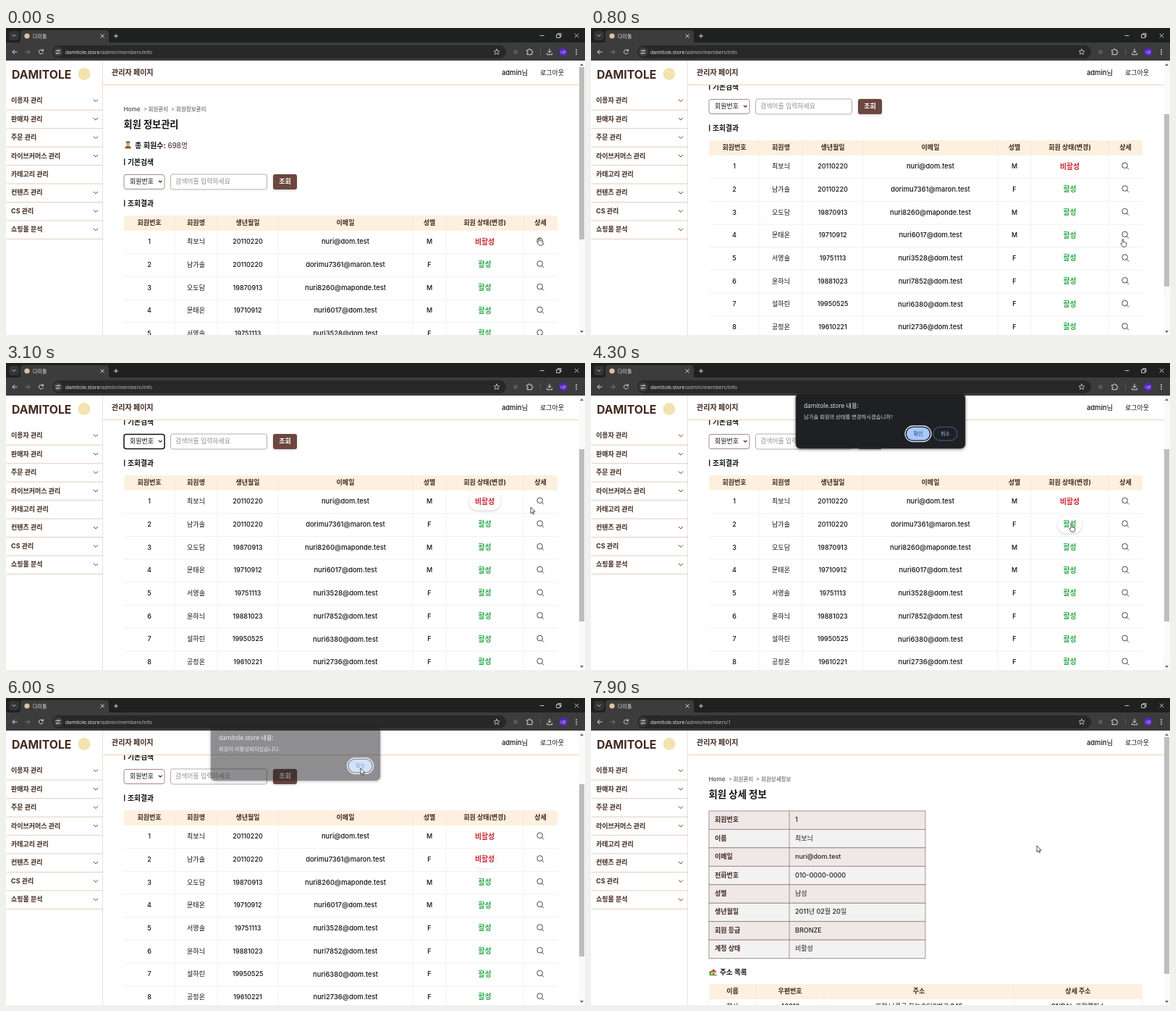
Animation of 800x424 px, one loop 8 s. Source, as an HTML page:

```html
<!DOCTYPE html>
<html lang="ko">
<head>
<meta charset="utf-8">
<title>회원 정보관리</title>
<style>
  html, body { margin: 0; width: 100%; height: 100%; overflow: hidden; background: #fff; }
  svg { display: block; }
  text { font-family: Inter, "Noto Sans CJK KR", "Noto Sans CJK", sans-serif; font-weight: 500; white-space: pre; }
  .b { font-weight: 700; }
  .m { text-anchor: middle; }
  .ui { font-family: "Open Sans", "Noto Sans CJK KR", "Noto Sans CJK", sans-serif; font-weight: 400; }
  .line { fill: none; stroke-linecap: round; stroke-linejoin: round; }
  .pill { filter: drop-shadow(0 1.5px 1.5px #0003); }
  .box { filter: drop-shadow(0 1px 2px #0007); }
</style>
</head>
<body>
<svg id="stage" width="800" height="424" viewBox="0 0 800 424"></svg>
<script>
const LOOP = 8000, STEP = 100, SCROLL = 104;
const BROWN = '#42291f', RED = '#c8202f', GREEN = '#28a745';
const HOST = 'damitole.store';

const members = [
  ['최보늬', '20110220', 'nuri@dom.test', 'M'],
  ['남가솔', '20110220', 'dorimu7361@maron.test', 'F'],
  ['오도담', '19870913', 'nuri8260@maponde.test', 'M'],
  ['문태온', '19710912', 'nuri6017@dom.test', 'M'],
  ['서영솔', '19751113', 'nuri3528@dom.test', 'F'],
  ['윤하늬', '19881023', 'nuri7852@dom.test', 'F'],
  ['설하린', '19950525', 'nuri6380@dom.test', 'F'],
  ['공정온', '19610221', 'nuri2736@dom.test', 'F']
];

// Shape helpers
const text = (x, y, s, size = 9, cls = '', fill = '#111', id = '') =>
  `<text x="${x}" y="${y}" dy=".36em" font-size="${size}" class="${cls}" fill="${fill}" ${id && `id="${id}"`}>${s}</text>`;
const rect = (x, y, w, h, fill, r = 0, more = '') =>
  `<rect x="${x}" y="${y}" width="${w}" height="${h}" rx="${r}" fill="${fill}" ${more}/>`;
const line = (d, color, width = 1) =>
  `<path class="line" d="${d}" stroke="${color}" stroke-width="${width}"/>`;
const circle = (x, y, r, fill, more = '') => `<circle cx="${x}" cy="${y}" r="${r}" fill="${fill}" ${more}/>`;
const group = (id, body, more = '') => `<g id="${id}" ${more}>${body}</g>`;

function browser() {
  const ink = '#d8d8d8';
  return rect(0, 0, 800, 21, '#1f2020') + rect(0, 20, 800, 25, '#3c3c3c') +
    rect(4, 4, 14, 13, '#343535', 4) + line('M9 9.5l2 2 2-2', ink) +
    `<path d="M17 20q3 0 3-3V7q0-4 4-4H138q4 0 4 4v10q0 3 3 3z" fill="#3c3c3c"/>` +
    circle(29, 11, 3.6, '#d9c79a') + text(37, 11, '다미톨', 7, 'ui', '#e3e3e3') +
    line('M131 8.8l4.4 4.4m0-4.4l-4.4 4.4', ink) +
    line('M149.5 11h5m-2.5-2.5v5', ink) +
    line('M738 10.5h5M761 9h4.5v4.5H761zM762.6 9V7.6h4.4V12h-1.4M786 8l5 5m0-5l-5 5', ink, .9) +
    line('M15 33H9m2.7-2.8L9 33l2.7 2.8', ink) +
    line('M27 33h6m-2.7-2.8L33 33l-2.7 2.8', '#7a7a7a') +
    line('M51 31.2a3 3 0 1 0 .3 2.8M51.4 29.4v2.2h-2.2', ink) +
    rect(64, 24, 627, 18, '#282828', 9) + circle(72, 33, 6.5, '#3c3c3c') +
    line('M69 31.2h2.6m2.6 0h.6M69 34.8h.6m2.6 0h2.6', ink) +
    circle(73, 31.2, 1, 'none', `stroke="${ink}" stroke-width=".8"`) +
    circle(70.8, 34.8, 1, 'none', `stroke="${ink}" stroke-width=".8"`) +
    `<text x="82" y="33" dy=".36em" font-size="7" class="ui" fill="#f0f0f0">${HOST}<tspan id="path" fill="#c4c4c4"></tspan></text>` +
    line('M678 29.2l1.1 2.4 2.7.3-2 1.8.6 2.7-2.4-1.4-2.4 1.4.6-2.7-2-1.8 2.7-.3z', ink, .8) +
    circle(704, 33, 3, '#5e5655') +
    line('M720 30.5h2q0-1.8 1.3-1.8t1.3 1.8h2v2q1.4 0 1.4 1.1t-1.4 1.1v2H720v-2q1.2 0 1.2-1.1T720 32.5z', ink) +
    line('M738.5 29v8', '#5c5c5c') +
    line('M751 29v5m-2.2-2l2.2 2 2.2-2M747.5 35v1.8h7V35', ink) +
    circle(770, 33, 6, '#5427b5') + text(770, 33, '다온', 4.2, 'ui m', '#fff') +
    [30, 33, 36].map(y => circle(788, y, .9, ink)).join('');
}

function sidebar() {
  const items = ['이용자 관리', '판매자 관리', '주문 관리', '라이브커머스 관리', '카테고리 관리', '컨텐츠 관리', 'CS 관리', '쇼핑몰 분석'];
  return rect(0, 45, 133, 379, '#fff') + line('M133.5 45V424', '#eedfd8') +
    text(8, 64, 'DAMITOLE', 15.8, 'b', BROWN) + circle(108, 63.5, 8.5, '#f2e3b0') +
    items.map((s, i) => {
      const y = 100 + i * 25.45;
      return text(7, y, s, 9, 'b', BROWN) + line(`M1 ${y + 13.3}H133`, '#dcbfb0', .8) +
        (i === 4 ? '' : line(`M121.3 ${y - 1}l2.7 2.7 2.7-2.7`, '#50403a'));
    }).join('');
}

function header() {
  return rect(134, 45, 657, 34, '#fff') + line('M134 78.5H791', '#f0cfb8') +
    text(146, 61.5, '관리자 페이지', 10, 'b', BROWN) +
    text(685, 61.5, 'admin님', 9.4) + text(738, 61.5, '로그아웃', 9);
}

const crumbs = last => text(162.5, 112, 'Home', 8.2, '', '#4b4b52') + text(190, 112, '&gt;', 7.5, '', '#777') +
  text(196.5, 112, '회원관리', 7.5, '', '#4b4b52') + text(228, 112, '&gt;', 7.5, '', '#777') +
  text(235, 112, last, 7.5, '', '#4b4b52');

const heading = (y, s) => rect(163, y - 4.5, 1.4, 9, '#222') + text(168, y, s, 9.8, 'b');

function tableHead(y, cols, names) {
  return `<path d="M163 ${y + 21}v-17q0-4 4-4H758q4 0 4 4v17z" fill="#fdf0df"/>` +
    names.map((s, i) => text((cols[i] + cols[i + 1]) / 2, y + 10, s, 9, 'b m', BROWN)).join('') +
    cols.slice(1, -1).map(x => line(`M${x} ${y}v21`, '#f3e6d8', .7)).join('');
}

function listPage() {
  const cols = [163, 233, 292, 376, 562, 608, 715, 762];
  const mid = i => (cols[i] + cols[i + 1]) / 2;
  let out = crumbs('회원정보관리') + text(162.5, 133.5, '회원 정보관리', 13.2, 'b') +
    circle(168.5, 159.5, 2.6, '#dba774') + rect(165.6, 156.6, 5.8, 2, '#7b4a2a', 1) +
    `<path d="M164.4 166.5q.2-4 4.2-4t4.2 4z" fill="#8a5a34"/>` +
    text(178, 162, '총 회원수:', 10.1, 'b') + text(223.5, 162, '698명', 9.8, '', '#5a3a33') +
    heading(185, '기본검색') +
    rect(163, 202.5, 56, 20, '#fff', 3, 'id="select"') + text(171, 212, '회원번호', 9) +
    line('M211.2 211.2l2 2 2-2', '#222', 1.2) +
    rect(227.5, 202, 133, 21, '#fff', 3, 'stroke="#b9aaa6" stroke-width="1"') +
    text(234, 212, '검색어를 입력하세요', 8.9, '', '#8f8f95') +
    rect(369, 202, 33, 21, '#6b4740', 3, 'class="pill"') + text(385.5, 212, '조회', 9, 'b m', '#fff') +
    heading(242, '조회결과') +
    tableHead(259, cols, ['회원번호', '회원명', '생년월일', '이메일', '성별', '회원 상태(변경)', '상세']);

  members.forEach(([name, birth, mail, sex], i) => {
    const top = 280 + i * 31.7, y = top + 15;
    const half = i ? 17 : 22;
    const cells = [i + 1, name, birth, mail, sex];
    out += line(`M163 ${top + 31.7}H762`, '#ececee', .8);
    out += cols.slice(1, -1).map(x => line(`M${x} ${top}v31.7`, '#efeff1', .8)).join('');
    out += cells.map((s, k) => text(mid(k), y, s, k === 3 ? 9.4 : 9, 'm')).join('');
    if (i < 2) out += rect(661.5 - half, y - 12, half * 2, 24.5, '#fff', 12, `id="pill${i}" class="pill"`);
    out += text(661.5, y, i ? '활성' : '비활성', 9.8, 'b m', i ? GREEN : RED, 'state' + i);
    out += circle(737.6, y - 1.2, 3.8, 'none', 'stroke="#5c3c36" stroke-width="1"') +
      line(`M740.4 ${y + 1.6}l2.4 2.4`, '#5c3c36');
  });
  return out;
}

function detailPage() {
  const rows = [['회원번호', '1'], ['이름', members[0][0]], ['이메일', members[0][2]], ['전화번호', '010-0000-0000'],
    ['성별', '남성'], ['생년월일', '2011년 02월 20일'], ['회원 등급', 'BRONZE'], ['계정 상태', '비활성']];
  const cols = [163, 228, 322, 584, 762], h = 25.45;
  const address = ['학사', '40210', '가람 나루구 하늘솔단6번로 245', 'ONDAL 가람캠퍼스'];
  return crumbs('회원상세정보') + text(162.5, 133.5, '회원 상세 정보', 13.4, 'b') +
    rows.map(([label, value], i) => {
      const y = 156 + i * h;
      return rect(163, y, 299, h, i % 2 ? '#f3f2f3' : '#eee8e7', 0, 'stroke="#927a73" stroke-width=".8"') +
        text(171, y + 12, label, 9, 'b', BROWN) + text(282, y + 12, value, 9, '', '#222');
    }).join('') +
    line('M274 156V359.6', '#927a73', .8) +
    circle(166.2, 379.5, 2.8, '#3fa344') + rect(166, 378, 6.5, 5, '#e5c79d') +
    `<path d="M164.6 378.5l4.7-4.3 4.7 4.3z" fill="#c4513d"/>` + rect(163.5, 382, 10.5, 1.4, '#4caf50') +
    rect(168.3, 379.8, 1.8, 3, '#8b5836') +
    text(178, 378.5, '주소 목록', 9.6, 'b') +
    tableHead(395, cols, ['이름', '우편번호', '주소', '상세 주소']) +
    cols.map(x => line(`M${x} 416V424`, '#ececee', .8)).join('') +
    address.map((s, i) => text((cols[i] + cols[i + 1]) / 2, 425.5, s, 9, 'm')).join('');
}

const okButton = x => rect(x - 18, 87, 36, 21.5, 'none', 10.75, 'stroke="#d6e4fd" stroke-width="1.3"') +
  rect(x - 16, 89, 32, 17.5, '#a8c7fa', 8.75) + text(x, 97.8, '확인', 7, 'ui m', '#0b3272');

const dialog = (id, message, buttons) => group(id,
  rect(283, 42, 234, 76, '#1f2023', 6, 'class="box" stroke="#3a3b3e" stroke-width=".6"') +
  text(294, 59, HOST + ' 내용:', 8.3, 'ui', '#eeeeee') + text(294, 74.3, message, 7.3, 'ui', '#d6d6d6') + buttons);

const cancelButton = rect(473, 88.3, 33, 18.8, 'none', 9.4, 'stroke="#4b6b99" stroke-width=".9"') +
  text(489.5, 97.8, '취소', 7, 'ui m', '#a8c7fa');

const stage = document.getElementById('stage');
stage.innerHTML =
  `<clipPath id="main"><rect x="134" y="79" width="657" height="345"/></clipPath>` +
  rect(0, 0, 800, 424, '#fff') +
  `<g clip-path="url(#main)">${group('list', listPage())}${group('detail', detailPage())}</g>` +
  sidebar() + header() +
  rect(791, 45, 9, 379, '#fafafa') + rect(792, 54, 7, 238, '#bdbdbd', 0, 'id="thumb"') +
  `<path d="M793 52l2.5-3 2.5 3zM793 418l2.5 3 2.5-3z" fill="#666"/>` +
  browser() +
  dialog('ask', members[1][0] + ' 회원의 상태를 변경하시겠습니까?', okButton(452) + cancelButton) +
  dialog('done', '회원이 비활성화되었습니다.', okButton(489.5)) +
  group('arrow', `<path d="M0 0v8.6l2-1.8 1.3 3 1.4-.6-1.3-2.9h2.7z" fill="#fff" stroke="#222" stroke-width=".8"/>`) +
  group('hand', `<path d="M-.9 5V.6q0-1 .9-1t.9 1V3.6l3 .7q1.2.4 1.1 1.6l-.5 2.6q-.2 1-.9 1.7H-.2L-3 6.6q-.5-.9.2-1.3.7-.3 1.2.3z" fill="#fff" stroke="#222" stroke-width=".8"/>`);

const el = Object.fromEntries([...stage.querySelectorAll('[id]')].map(n => [n.id, n]));

// Linear value along [time, value] steps
function track(t, steps) {
  const i = steps.findIndex(s => s[0] > t);
  if (i < 0) return steps[steps.length - 1][1];
  if (i === 0) return steps[0][1];
  const [t0, a] = steps[i - 1], [t1, b] = steps[i];
  return a + (b - a) * (t - t0) / (t1 - t0);
}

const scrollSteps = [[0, 0], [100, 12], [200, 45], [300, 78], [400, 96], [500, SCROLL]];
const askSteps = [[3800, 0], [4000, 1], [5000, 1], [5200, .25], [5300, 0]];
const doneSteps = [[5100, 0], [5200, .55], [5300, 1], [5900, 1], [6100, 0]];
const pillSteps = [
  [[2600, 0], [2800, 1], [3100, 1], [3300, 0]],
  [[3400, 0], [3600, 1], [5900, 1], [6100, 0]]
];
// time, x, y, hand pointer
const pointer = [
  [0, 737, 290, 1], [700, 735, 292, 1], [1000, 735, 292, 0], [1600, 205, 108, 0], [2200, 205, 108, 0],
  [2700, 662, 192, 1], [2900, 666, 194, 0], [3100, 725, 199, 0], [3300, 716, 208, 0], [3600, 664, 223, 1],
  [4500, 664, 223, 0], [4900, 454, 100, 0], [5300, 454, 100, 0], [5600, 490, 97, 0], [6000, 490, 97, 0],
  [6500, 718, 195, 0], [6600, 722, 194, 0], [6800, 737, 188, 1], [7100, 737, 188, 0],
  [7600, 630, 203, 0], [7900, 616, 204, 0]
];
const xs = pointer.map(p => [p[0], p[1]]), ys = pointer.map(p => [p[0], p[2]]);

const show = (node, on) => node.setAttribute('display', on ? 'inline' : 'none');

function fade(node, opacity) {
  show(node, opacity > 0);
  node.setAttribute('opacity', opacity);
  node.setAttribute('transform', `translate(0 ${-8 * (1 - opacity)})`);
}

function draw(t) {
  const detail = t >= 7100, off = track(t, scrollSteps);
  show(el.list, !detail);
  show(el.detail, detail);
  el.list.setAttribute('transform', `translate(0 ${-off})`);
  el.thumb.setAttribute('y', detail ? 54 : 54 + off * 65 / SCROLL);
  el.thumb.setAttribute('height', detail ? 327 : 238);
  el.path.textContent = '/admin/members/' + (detail ? '1' : 'info');

  const focus = t >= 1700 && t < 3800;
  el.select.setAttribute('stroke', focus ? '#111' : '#a48a84');
  el.select.setAttribute('stroke-width', focus ? 1.5 : 1);
  pillSteps.forEach((s, i) => el['pill' + i].setAttribute('opacity', track(t, s)));
  const off2 = t >= 6000;
  el.state1.textContent = off2 ? '비활성' : '활성';
  el.state1.setAttribute('fill', off2 ? RED : GREEN);

  fade(el.ask, track(t, askSteps));
  fade(el.done, track(t, doneSteps));

  const hand = pointer.filter(p => p[0] <= t).pop()[3];
  show(el.hand, hand);
  show(el.arrow, !hand);
  el[hand ? 'hand' : 'arrow'].setAttribute('transform', `translate(${track(t, xs)} ${track(t, ys)})`);
}

const start = performance.now();
function tick() {
  const t = (performance.now() - start) % LOOP;
  draw(Math.floor(t / STEP) * STEP);
  requestAnimationFrame(tick);
}
draw(0);
requestAnimationFrame(tick);
</script>
</body>
</html>
```
